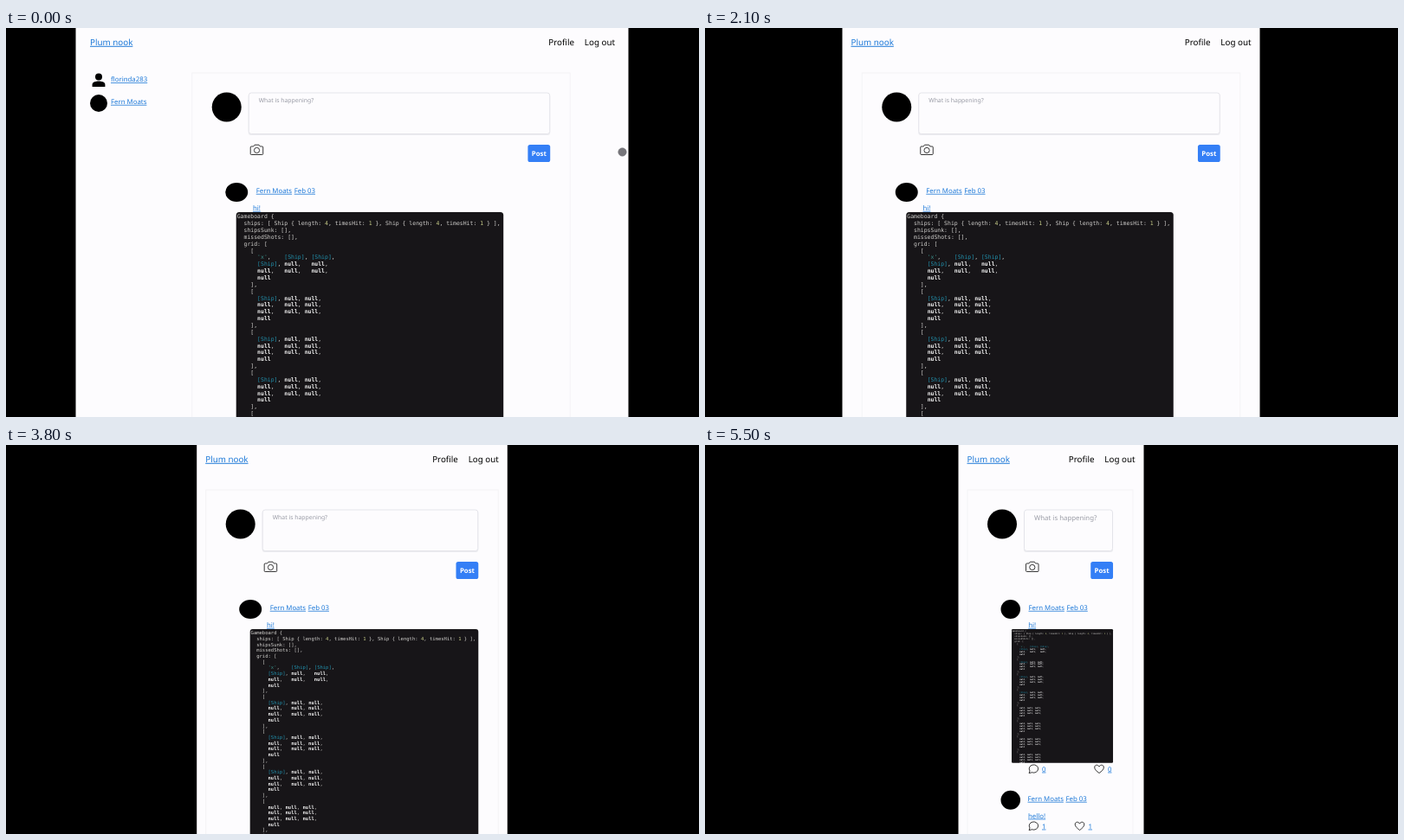
Recreate the animation shown at these times as an HTML page. Size 800 by 450 pixels, loop 5600 ms.

```html
<!DOCTYPE html>
<html lang="en">
<head>
<meta charset="utf-8">
<title>Responsive feed</title>
<style>
  html, body { margin: 0; width: 100%; height: 100%; overflow: hidden; background: #000; }
  svg { display: block; width: 800px; height: 450px; }
  text { font: 7.84px "Noto Sans", "Open Sans", sans-serif; white-space: pre; text-rendering: geometricPrecision; }
  .big { font-size: 9.8px; }
  .link { fill: #1d79d8; text-decoration: underline; }
  .code text { font: 6.48px "DejaVu Sans Mono", monospace; fill: #d0cfcc; }
  .ship { fill: #2190ac; }
  .hit { fill: #3c8f8a; }
  .num { fill: #c9cf8a; }
  .null { fill: #f2f2f2; font-weight: bold; }
  .line { fill: none; stroke: #222; stroke-width: .9; stroke-linejoin: round; }
</style>
</head>
<body>
<svg viewBox="0 0 800 450">
  <defs>
    <clipPath id="pageClip"><rect id="clipRect" height="450"/></clipPath>
    <path id="bubble" class="line" d="M-4.9 4.9 -4 2.2A5.2 4.6 0 1 1-1.6 4Z"/>
    <path id="heart" class="line" d="M0 4.8C-3 2.5-5.3.5-5.3-1.8-5.3-5-1.4-5.6 0-2.6 1.4-5.6 5.3-5 5.3-1.8 5.3.5 3 2.5 0 4.8Z"/>
  </defs>
  <rect width="800" height="450"/>
  <g clip-path="url(#pageClip)">
    <rect width="800" height="450" fill="#fdfcfe"/>
    <rect id="panel" y="52" height="420" fill="none" stroke="#f4f3f6"/>

    <text id="brand" class="big link" y="19.8">Plum nook</text>
    <g id="nav" class="big" text-anchor="end">
      <text class="big" x="-47" y="19.8">Profile</text>
      <text class="big" y="19.8">Log out</text>
    </g>

    <g id="sidebar">
      <circle cx="10" cy="56.4" r="4"/>
      <path d="M2.6 68V65.500C2.600 62.500 7 61.600 10 61.600S17.400 62.500 17.400 65.500V68Z"/>
      <text class="link" x="24" y="62">florinda283</text>
      <circle cx="10" cy="87" r="10"/>
      <text class="link" x="24" y="87.800">Fern Moats</text>
    </g>

    <g id="composer">
      <circle cx="17" cy="91.500" r="17"/>
      <rect id="boxShadow" x="42" y="76" height="48" rx="3" fill="#ececf0"/>
      <rect id="box" x="42.500" y="75" height="47.500" rx="3" fill="#fdfcfe" stroke="#e2e2e8" stroke-width=".9"/>
      <text id="hint" x="54" fill="#9a9ca6">What is happening?</text>
      <path class="line" d="M45.500 137H48L49.300 135.200H54.300L55.600 137H58Q59 137 59 138V145.500Q59 146.500 58 146.500H45.500Q44.500 146.500 44.500 145.500V138Q44.500 137 45.500 137Z"/>
      <circle class="line" cx="51.800" cy="141.500" r="3.100"/>
    </g>
    <g id="post">
      <rect x="-25.800" y="135" width="25.800" height="20" rx="2.600" fill="#347ff6"/>
      <text x="-12.900" y="148.400" text-anchor="middle" fill="#fff" font-weight="bold" style="font-weight:bold">Post</text>
    </g>

    <g id="first">
      <ellipse class="avatar" cy="190" ry="11"/>
      <g class="byline">
        <text class="link" y="190.800">Fern Moats</text>
        <text class="link" x="44" y="190.800">Feb 03</text>
      </g>
      <text class="link" x="47.200" y="210.800">hi!</text>
    </g>

    <g id="shot" class="code"></g>

    <g id="below">
      <use href="#bubble" x="25" y="7"/>
      <text class="link" x="35" y="9.800">0</text>
      <g id="likes">
        <use href="#heart" x="-16" y="7"/>
        <text class="link" x="-6" y="9.800">0</text>
      </g>
      <g transform="translate(-28)">
        <ellipse class="avatar" cy="43" ry="11"/>
        <g class="byline">
          <text class="link" x="-1" y="44">Fern Moats</text>
          <text class="link" x="43" y="44">Feb 03</text>
        </g>
      </g>
      <text class="link" x="19" y="63.800">hello!</text>
      <use href="#bubble" x="25" y="73"/>
      <text class="link" x="35" y="75.800">1</text>
      <use href="#heart" x="78.500" y="73"/>
      <text class="link" x="88.500" y="75.800">1</text>
    </g>

    <g id="size">
      <rect x="-67" width="70" height="12.200" fill="#fdfcfe" opacity=".93"/>
      <text x="-5" y="10" text-anchor="end" fill="#333"></text>
    </g>
    <circle id="cursor" r="4.600" fill="#77767b" stroke="#68676c" stroke-width=".8"/>
  </g>
</svg>
<script>
const LOOP = 5600, STEP = 100, CENTER = 399.5;
const SHOT = { width: 308.5, height: 408, top: 213, line: 7.86 };
const CSS_PX = 2.039;   // page pixels per stage pixel
const SIDEBAR_MIN = 588, WIDE_MIN = 628, SMALL_HINT = 314;

// [ms, half of the page width]
const WIDTH_KEYS = [[0, 319], [400, 319], [600, 316.5], [900, 307], [1200, 275], [1600, 264.5],
  [1800, 253.5], [2400, 228.5], [2700, 217], [3000, 212], [3400, 203.5], [3500, 203.5],
  [3800, 179.3], [4100, 169], [4400, 137], [4700, 131], [5300, 111.5], [5500, 107]];
// [ms, offset from the right page edge]
const CURSOR_KEYS = [[0, -7], [400, -4], [600, -1], [900, 0], [1600, -1.5]];

const $ = id => document.getElementById(id);
const move = (id, x, y = 0) => $(id).setAttribute('transform', `translate(${x} ${y})`);
const set = (el, attrs) => { for (const k in attrs) el.setAttribute(k, attrs[k]); };
const show = (id, on) => { $(id).style.display = on ? '' : 'none'; };
const each = (selector, fn) => document.querySelectorAll(selector).forEach(fn);

function interpolate(keys, t) {
  const i = keys.findIndex(k => k[0] > t);
  if (i < 0) return keys[keys.length - 1][1];
  const [t0, a] = keys[i - 1], [t1, b] = keys[i];
  return a + (b - a) * (t - t0) / (t1 - t0);
}

function terminalLines() {
  const ship = 'Ship { length: 4, timesHit: 1 }';
  const block = rows => ['    [', ...rows.map(r => '      ' + r), '      null', '    ],'];
  const hit = block(["'x',    [Ship], [Ship],", '[Ship], null,   null,', 'null,   null,   null,']);
  const mixed = block(['[Ship], null, null,', 'null,   null, null,', 'null,   null, null,']);
  const empty = block(Array(3).fill('null, null, null,'));
  return ['Gameboard {', `  ships: [ ${ship}, ${ship} ],`, '  shipsSunk: [],', '  missedShots: [],', '  grid: [',
    ...hit, ...mixed, ...mixed, ...mixed, ...empty, ...empty, ...empty, ...empty].slice(0, 52);
}

function highlight(line) {
  return line.replace(/\[Ship\]|'x'|null|\d/g, token => {
    const kind = token === 'null' ? 'null' : token === "'x'" ? 'hit' : token === '[Ship]' ? 'ship' : 'num';
    return `<tspan class="${kind}">${token}</tspan>`;
  });
}

$('shot').innerHTML = `<rect width="${SHOT.width}" height="${SHOT.height}" rx="3.5" fill="#171518"/>` +
  terminalLines().map((line, i) => `<text x="1" y="${7.2 + i * SHOT.line}">${highlight(line)}</text>`).join('');

function draw(t) {
  const half = interpolate(WIDTH_KEYS, t), width = half * 2;
  const left = CENTER - half, right = CENTER + half;
  const hasSidebar = width >= SIDEBAR_MIN, wide = width >= WIDE_MIN;

  set($('clipRect'), { x: left, width });
  move('brand', left + (wide ? 16.5 : 10));
  move('nav', right - (wide ? 15.5 : hasSidebar ? 12.3 : 10));
  show('sidebar', hasSidebar);
  move('sidebar', left + (wide ? 16.5 : 10));

  const column = Math.min(390.5, width - 67);
  const middle = CENTER + (hasSidebar ? 32 + (width - 613.5) * .06 : 0);
  const x = middle - column / 2;
  const end = middle + column / 2 - Math.max(0, 250 - width) * .055;
  set($('panel'), { x: x - 23, width: end - x + 46 });

  move('composer', x);
  set($('box'), { width: end - x - 43 });
  set($('boxShadow'), { width: end - x - 42 });
  const largeHint = width < SMALL_HINT;
  $('hint').style.fontSize = largeHint ? '7.84px' : '6.86px';
  set($('hint'), { y: largeHint ? 87.3 : 85.5 });
  move('post', end);

  const avatar = Math.min(26, 22.5 + (width - 214) * .035);
  each('.avatar', el => set(el, { cx: x - x + 15.5 + avatar / 2, rx: avatar / 2 }));
  each('.byline', el => set(el, { transform: `translate(${25 + avatar})` }));
  move('first', x);

  const shotX = x + 28, scale = Math.min(1, (end - shotX) / SHOT.width);
  set($('shot'), { transform: `translate(${shotX} ${SHOT.top}) scale(${scale})` });
  move('below', shotX, SHOT.top + SHOT.height * scale);
  move('likes', SHOT.width * scale);

  show('size', t >= 600 && t <= 1200);
  move('size', right);
  $('size').lastElementChild.textContent = `${Math.round(width * CSS_PX) - 1}px × 922px`;

  show('cursor', t < 2000);
  move('cursor', right + interpolate(CURSOR_KEYS, t), 143.5 - 3 * Math.min(1, t / 600));
}

let last = -1;
function tick() {
  const t = Math.floor(performance.now() % LOOP / STEP) * STEP;
  if (t !== last) draw(last = t);
  requestAnimationFrame(tick);
}
tick();
</script>
</body>
</html>
```
